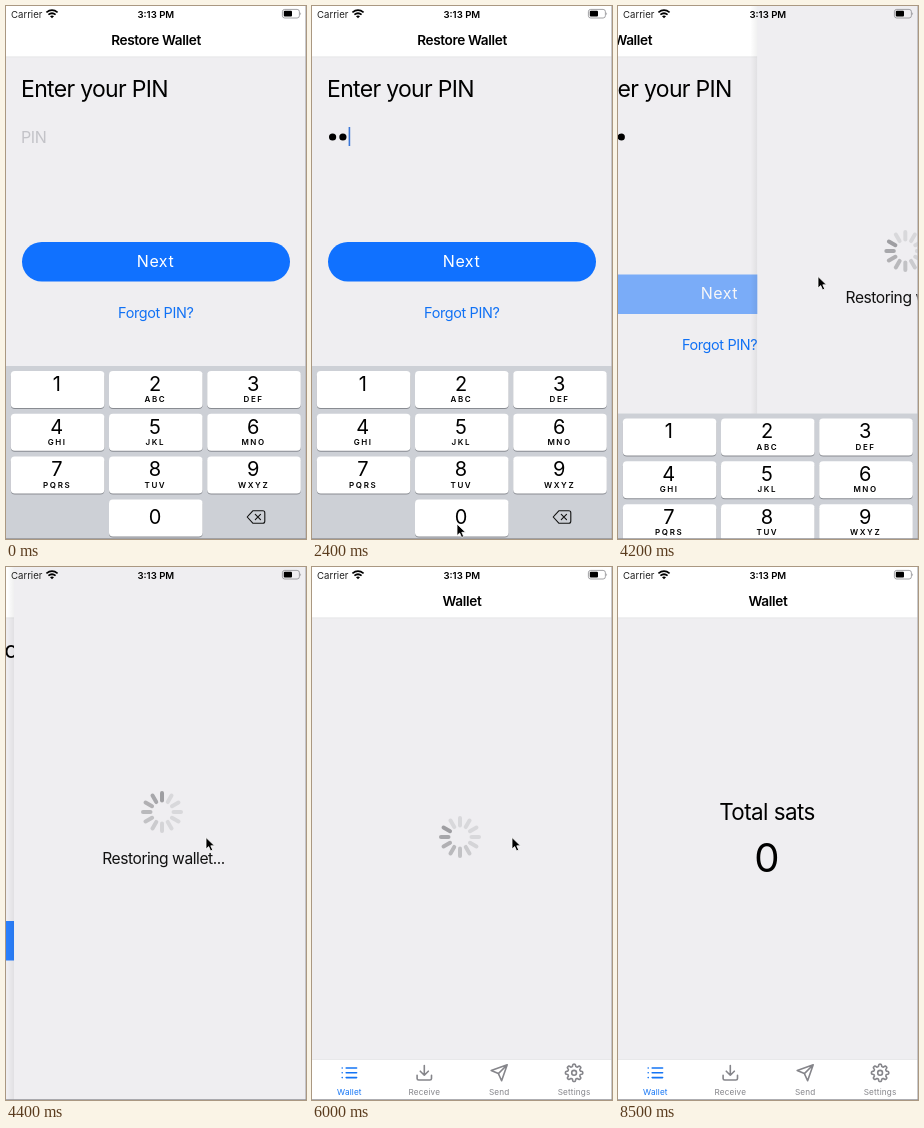
Animation, 300 px wide and 533 px high, one loop 9000 ms. Source, as an HTML page:

```html
<!DOCTYPE html>
<html lang="en">
<head>
<meta charset="utf-8">
<title>Restore wallet</title>
<style>
  html, body { margin: 0; width: 100%; height: 100%; overflow: hidden; background: #efeef1; }
  svg { display: block; width: 100%; height: 100%; }
  text { font-family: Inter, "Liberation Sans", sans-serif; }
  .mid { text-anchor: middle; }
  .title { font-size: 13.6px; font-weight: 600; letter-spacing: -.35px; text-anchor: middle; }
  .digit { font-size: 20px; text-anchor: middle; }
  .letters { font-size: 8px; font-weight: 600; letter-spacing: 1.6px; text-anchor: middle; }
  .label { font-size: 8.2px; letter-spacing: .15px; text-anchor: middle; }
  .icon { fill: none; stroke-width: 2; stroke-linecap: round; stroke-linejoin: round; }
  .spoke { stroke: #6e6e72; stroke-width: 4; stroke-linecap: round; }
</style>
</head>
<body>
<svg viewBox="0 0 300 533">
  <defs>
    <linearGradient id="shade">
      <stop offset="0" stop-opacity="0"/>
      <stop offset="1" stop-opacity=".06"/>
    </linearGradient>
    <g id="bar">
      <rect width="300" height="51" fill="#fff"/>
      <rect y="50.6" width="300" height=".6" fill="#d9d9dc"/>
    </g>
    <g id="page">
      <rect x="-7" width="7" height="533" fill="url(#shade)"/>
      <rect width="300" height="533" fill="#efeef1"/>
    </g>
  </defs>

  <g id="pinBody">
    <rect width="300" height="533" fill="#efeef1"/>
    <text x="15" y="90.5" font-size="23" letter-spacing="-.68">Enter your PIN</text>
    <text id="hint" x="15" y="136.7" font-size="16" letter-spacing="-.4" fill="#c3c3c8">PIN</text>
    <g id="dots"></g>
    <rect id="caret" y="121" width="1.6" height="19" fill="#3a76d8"/>
    <g id="actions">
      <g id="next">
        <rect x="16" y="236" width="268" height="39.5" rx="19.75" fill="#1071ff"/>
        <text class="mid" x="149.5" y="260.8" font-size="16" letter-spacing=".5" fill="#fff">Next</text>
      </g>
      <text class="mid" x="149.8" y="312" font-size="14.4" letter-spacing="-.35" fill="#1071f5">Forgot PIN?</text>
    </g>
  </g>
  <g id="pinHeader">
    <use href="#bar"/>
    <text class="title" x="150" y="38.5">Restore Wallet</text>
  </g>

  <g id="restoring">
    <use href="#page"/>
    <g id="spinnerA" transform="translate(148 245)"></g>
    <text class="mid" x="149.5" y="296.5" font-size="15.6" letter-spacing="-.45" fill="#111">Restoring wallet...</text>
  </g>

  <g id="wallet">
    <use href="#page"/>
    <use href="#bar"/>
    <text class="title" x="150" y="38.5">Wallet</text>
    <g id="spinnerB" transform="translate(148 270)"></g>
    <g id="total">
      <text class="mid" x="149" y="252.5" font-size="22.4" letter-spacing="-.55">Total sats</text>
      <text class="mid" x="148.8" y="305" font-size="40">0</text>
    </g>
    <rect y="492" width="300" height="41" fill="#fff"/>
    <rect y="492" width="300" height=".6" fill="#d9d9dc"/>
    <g id="tabs"></g>
  </g>

  <g id="keyboard">
    <rect y="360" width="300" height="173" fill="#cdd0d6"/>
    <g id="keys"></g>
    <path d="M246.8 504.8h10q2 0 2 2v8.4q0 2-2 2h-10l-5.6-6.2zM249.3 508.4l5.2 5.2m0-5.2l-5.2 5.2"
      fill="none" stroke="#111" stroke-width="1.1" stroke-linejoin="round" stroke-linecap="round"/>
  </g>

  <text x="5" y="11.5" font-size="9.6" fill="#222">Carrier</text>
  <path d="M40.4 6.4Q46 1.9 51.6 6.4M42.4 8.7Q46 5.8 49.6 8.7" fill="none" stroke="#000" stroke-width="1.7"/>
  <path d="M44 10.3Q46 8.8 48 10.3L46 12.3z"/>
  <text class="mid" x="149.8" y="11.5" font-size="9.6" font-weight="600">3:13 PM</text>
  <rect x="276.4" y="3.4" width="17" height="8.6" rx="2.3" fill="none" stroke="#8b8b8e" stroke-width=".8"/>
  <rect x="277.8" y="4.8" width="8.2" height="5.8" rx="1"/>
  <path d="M294.4 6.2q1.5 1.5 0 3z" fill="#8b8b8e"/>

  <path d="M299.6 0V533" stroke="#b4b4b8" stroke-width=".8"/>
  <path d="M0 532.6H300" stroke="#8f8f93" stroke-width=".8"/>

  <path id="pointer" d="M0 0V11.6L2.7 9.1L4.6 13.4L6.7 12.5L4.8 8.3H8.5z" stroke="#fff" stroke-width=".8"/>
</svg>

<script>
const LOOP = 9000, STEP = 100;
const PRESSES = [1600, 2100, 2600, 3000];
const $ = id => document.getElementById(id);
const range = n => [...Array(n).keys()];
const clamp = (v, lo = 0, hi = 1) => Math.min(hi, Math.max(lo, v));
const show = (id, on) => $(id).setAttribute('visibility', on ? 'inherit' : 'hidden');
const move = (id, x, y = 0) => $(id).setAttribute('transform', `translate(${x} ${y})`);
const lerp = (a, b, p) => a + (b - a) * p;

function smooth(t, from, to) {
  const p = clamp((t - from) / (to - from));
  return p * p * (3 - 2 * p);
}

// 500 ms push: cubic-bezier(.2833, .99, .3183, .99)
function push(t, start) {
  const goal = clamp((t - start) / 500);
  const curve = (s, a, b) => 3 * (1 - s) ** 2 * s * a + 3 * (1 - s) * s * s * b + s ** 3;
  let lo = 0, hi = 1;
  for (let i = 0; i < 24; i++) {
    const s = (lo + hi) / 2;
    if (curve(s, .2833, .3183) < goal) lo = s; else hi = s;
  }
  return goal === 1 ? 1 : goal === 0 ? 0 : curve(lo, .99, .99);
}

function buildKeys() {
  const letters = ['', 'ABC', 'DEF', 'GHI', 'JKL', 'MNO', 'PQRS', 'TUV', 'WXYZ'];
  const key = (digit, col, row, sub) => {
    const x = 4.8 + 98.2 * col, y = 365 + 42.8 * row, mid = x + 46.8;
    return `<rect x="${x}" y="${y + 1}" width="93.6" height="37" rx="4" fill="#898c92"/>
      <rect id="key${digit}" x="${x}" y="${y}" width="93.6" height="37" rx="4" fill="#fff"/>
      <text class="digit" x="${mid - .8}" y="${y + (digit ? 19.8 : 25)}">${digit}</text>
      <text class="letters" x="${mid - .4}" y="${y + 31}">${sub}</text>`;
  };
  $('keys').innerHTML = letters.map((sub, i) => key(i + 1, i % 3, i / 3 | 0, sub)).join('') + key(0, 1, 3, '');
}

function gearPath() {
  return 'M' + range(96).map(i => {
    const a = i / 96 * 2 * Math.PI;
    const r = 9.4 + clamp(2.4 * Math.cos(8 * a), -1.4, 1.4);
    return `${(12 + r * Math.cos(a)).toFixed(2)} ${(12 + r * Math.sin(a)).toFixed(2)}`;
  }).join('L') + 'z';
}

function buildTabs() {
  const tabs = [
    ['Wallet', 'M8 6H21M8 12H21M8 18H21M3 6h.01M3 12h.01M3 18h.01'],
    ['Receive', 'M21 15v4a2 2 0 0 1-2 2H5a2 2 0 0 1-2-2v-4M7 10l5 5 5-5M12 15V3'],
    ['Send', 'M22 2L11 13M22 2L15 22 11 13 2 9z'],
    ['Settings', gearPath() + 'M15 12a3 3 0 1 1-6 0a3 3 0 1 1 6 0z'],
  ];
  $('tabs').innerHTML = tabs.map(([name, d], i) => {
    const x = 37.4 + 74.9 * i, color = i ? '#85858a' : '#1475f5';
    return `<path class="icon" d="${d}" stroke="${color}" transform="translate(${x - 9.6} 496.2) scale(.8)"/>
      <text class="label" x="${x}" y="528.3" fill="${color}">${name}</text>`;
  }).join('');
}

function buildSpinner(id) {
  $(id).innerHTML = range(12).map(i =>
    `<path class="spoke" d="M0-11.5V-19" transform="rotate(${30 * i})"/>`).join('');
}

function spin(id, head) {
  [...$(id).children].forEach((spoke, i) => {
    const age = ((Math.floor(head) - i) % 12 + 12) % 12;
    spoke.setAttribute('opacity', Math.max(.17, .62 - .07 * age));
  });
}

function drawPin(t) {
  const typed = PRESSES.filter(p => t >= p + 100);
  const count = typed.length;
  show('hint', !count);
  [...$('dots').children].forEach((dot, i) =>
    dot.setAttribute('visibility', i < count ? 'inherit' : 'hidden'));

  const lastInput = count ? typed[count - 1] + 100 : 200;
  show('caret', t < 4100 && (t - lastInput + 1000) % 1000 < 600);
  $('caret').setAttribute('x', 16.2 + 10.2 * count);

  const held = PRESSES.some(p => t >= p && t < p + 100);
  const fading = PRESSES.some(p => t >= p + 100 && t < p + 200);
  $('key0').setAttribute('fill', held ? '#b9bdc6' : fading ? '#e3e5e9' : '#fff');

  $('next').setAttribute('opacity', t < 4000 ? 1 : .52 + .48 * smooth(t, 4200, 4500));
  const drop = smooth(t, 4100, 4390);
  move('actions', 0, 118 * drop);
  move('keyboard', 0, 173 * drop);
  show('keyboard', drop < 1);
}

function drawPointer(t) {
  const enter = smooth(t, 200, 1000), leave = smooth(t, 3300, 3900);
  const x = lerp(lerp(273, 145, enter), 200, leave);
  const y = lerp(lerp(536, 518, enter), 270.5, leave);
  move('pointer', x, y);
  show('pointer', t >= 200 && t < 7400);
}

function draw(t) {
  const first = push(t, 4117), second = push(t, 4849);
  move('pinBody', -90 * first);
  move('pinHeader', -300 * first);
  move('restoring', 300 * (1 - first) - 90 * second);
  move('wallet', 300 * (1 - second));
  show('restoring', first > 0);
  show('wallet', second > 0);

  drawPin(t);
  spin('spinnerA', 10.1 + (t - 4200) * .012);
  spin('spinnerB', 10.1 + (t - 6000) * .012);
  show('spinnerB', t < 8500);
  show('total', t >= 8500);
  drawPointer(t);
}

buildKeys();
buildTabs();
buildSpinner('spinnerA');
buildSpinner('spinnerB');
$('dots').innerHTML = range(4).map(i => `<circle cx="${20.6 + 10.3 * i}" cy="131" r="3.6"/>`).join('');

const start = performance.now();
function tick() {
  const t = (performance.now() - start) % LOOP;
  draw(Math.floor(t / STEP) * STEP);
  requestAnimationFrame(tick);
}
tick();
</script>
</body>
</html>
```
